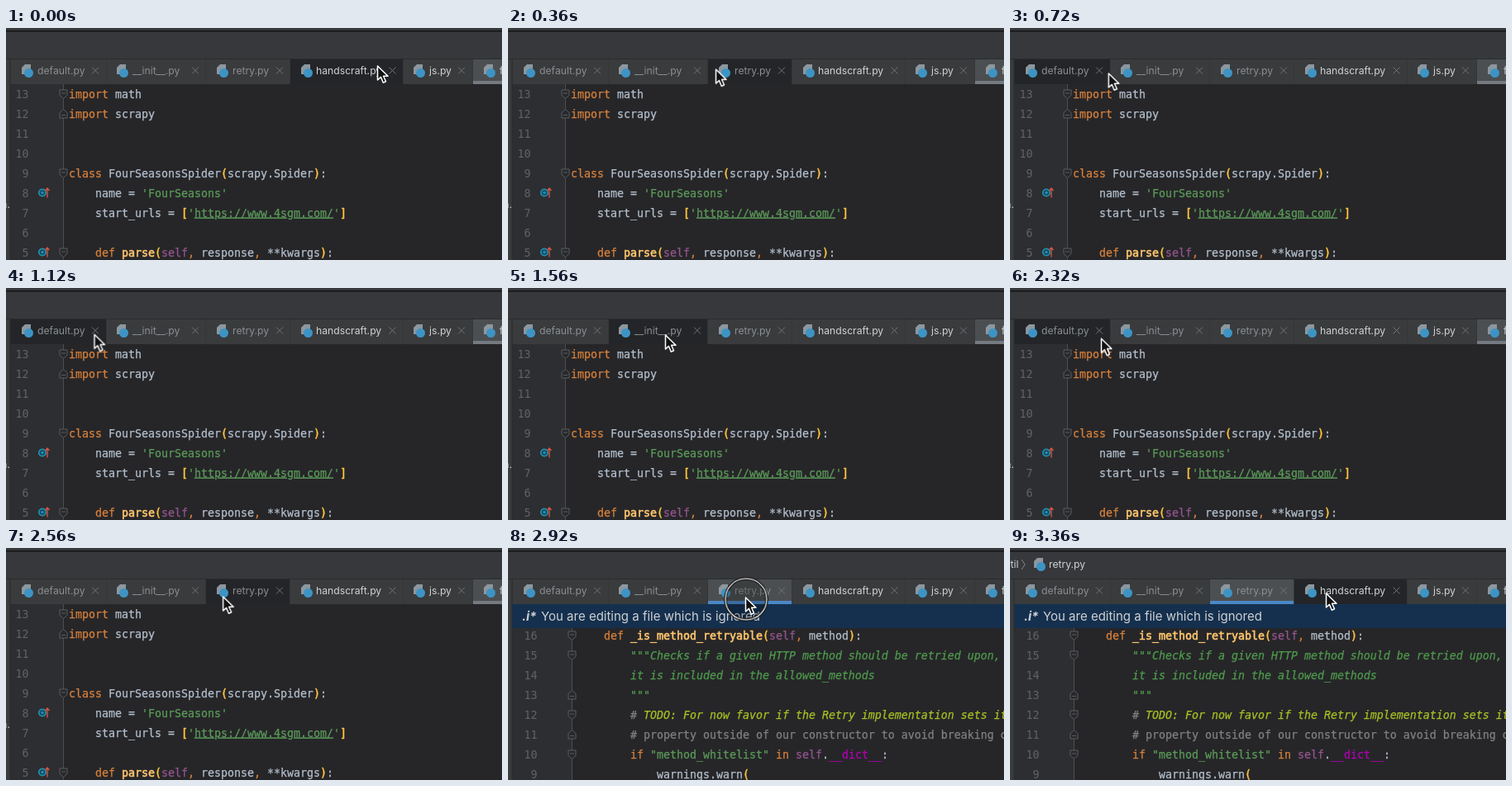
Write an HTML page that moves like this. It is 600x281 px and loops after 3400 ms.

```html
<!DOCTYPE html>
<html lang="en">
<head>
<meta charset="utf-8">
<title>Editor tabs</title>
<style>
html, body { margin: 0; width: 100%; height: 100%; overflow: hidden; background: #262629; }
svg { display: block; width: 600px; height: 281px; }
text { white-space: pre; }
.code { font: 13.29px "DejaVu Sans Mono", "Noto Sans Mono", monospace; color: #b3bfcc; }
.code > text { fill: currentColor; stroke: currentColor; stroke-width: .25px; }
.num { fill: #606366; text-anchor: end; }
.ui { font: 12.2px Inter, "Liberation Sans", sans-serif; fill: #8b8e91; }
.lit { fill: #cfd1d3; }
.banner { font-size: 15px; }
.mark { font-weight: 700; font-style: italic; }
.k { color: #d7803a; }
.s { color: #5b9a58; }
.u { text-decoration: underline #5a8a88; }
.p { color: #94558d; }
.f { color: #ffc66d; stroke-width: .6px; }
.b { color: #ffc53d; stroke-width: .5px; }
.c { color: #808080; }
.d { color: #4f9a4c; font-style: italic; }
.t { color: #a8c023; font-style: italic; }
.m { color: #b200b2; }
.fold { fill: #28292c; stroke: #595c5f; }
.hover { fill: #232528; }

.cursor, .hover, .before, .after, .crumb, .ring { animation: 3.4s infinite step-end; }
.cursor { animation-name: move; animation-timing-function: linear; }
.before { animation-name: before; }
.after { animation-name: after; }
.crumb { animation-name: crumb; }
.ring { animation-name: press; }
.h1 { animation-name: h1; }
.h2 { animation-name: h2; }
.h3 { animation-name: h3; }
.h4 { animation-name: h4; }

@keyframes move {
  0%, 1.18% { transform: translate(449px, 45px); }
  8.5% { transform: translate(298px, 48px); }
  14% { transform: translate(176px, 51px); }
  17.6% { transform: translate(134px, 53px); }
  21.18% { transform: translate(119px, 54px); }
  25% { transform: translate(85px, 56px); }
  29% { transform: translate(80px, 56px); }
  35.3% { transform: translate(122px, 55px); }
  41% { transform: translate(172px, 56px); }
  45.88% { transform: translate(190px, 56px); }
  50% { transform: translate(187px, 57px); }
  58.82% { transform: translate(120px, 61px); }
  62.5% { transform: translate(90px, 62px); }
  66% { transform: translate(88px, 61px); }
  69.4% { transform: translate(121px, 60px); }
  75.29% { transform: translate(262px, 58px); }
  79.5% { transform: translate(284px, 59px); }
  82.3%, 88% { transform: translate(287px, 59px); }
  91% { transform: translate(304px, 58px); }
  98.8%, 100% { transform: translate(382px, 54px); }
}
@keyframes before { 0% { opacity: 1; } 84.7%, 100% { opacity: 0; } }
@keyframes after { 0% { opacity: 0; } 84.7%, 100% { opacity: 1; } }
@keyframes crumb { 0% { opacity: 0; } 88.2%, 100% { opacity: 1; } }
@keyframes press {
  0% { opacity: 0; transform: scale(1.15); }
  82.3% { opacity: 1; transform: scale(1.15); }
  83.5% { opacity: 1; transform: scale(1.07); }
  84.7% { opacity: 1; transform: none; }
  89.4%, 100% { opacity: 0; transform: none; }
}
@keyframes h1 { 0% { opacity: 0; } 20% { opacity: 1; } 35.3% { opacity: 0; } 60% { opacity: 1; } 69.4%, 100% { opacity: 0; } }
@keyframes h2 { 0% { opacity: 0; } 11.7% { opacity: 1; } 20% { opacity: 0; } 35.3% { opacity: 1; } 60% { opacity: 0; } 69.4% { opacity: 1; } 74.1%, 100% { opacity: 0; } }
@keyframes h3 { 0% { opacity: 0; } 6.4% { opacity: 1; } 11.7% { opacity: 0; } 74.1% { opacity: 1; } 84.7%, 100% { opacity: 0; } }
@keyframes h4 { 0% { opacity: 1; } 6.4% { opacity: 0; } 94.1%, 100% { opacity: 1; } }
</style>
</head>
<body>
<svg viewBox="0 0 600 281">
  <defs>
    <g id="file">
      <path d="M5 0h7v12H1V4z" fill="#8c979f"/>
      <circle cx="9.5" cy="10.5" r="5.5" fill="#3d94c4"/>
    </g>
    <path id="close" d="M-4-4l8 8m0-8l-8 8" stroke="#717477" fill="none"/>
    <g id="open" class="fold">
      <path d="M-4.5-5h9v6.5L0 5.5l-4.5-4z"/>
      <path d="M-2.5-1h5"/>
    </g>
    <g id="end" class="fold">
      <path d="M-4.5 5h9v-6.5L0-5.5l-4.5 4z"/>
      <path d="M-2.5 1.5h5"/>
    </g>
    <g id="override">
      <circle r="4.2" fill="#1c4350" stroke="#1f8fb4" stroke-width="1.8"/>
      <circle r="1.8" fill="#1f8fb4"/>
      <path d="M6 6V-5M3.5-2.5L6-5.5l2.5 3" fill="none" stroke="#e0553f" stroke-width="1.3"/>
    </g>
  </defs>

  <rect width="600" height="281" fill="#262629"/>
  <rect width="600" height="38" fill="#37383b"/>
  <rect y="38" width="600" height="30" fill="#393b3d"/>
  <rect y="3" width="600" height="1.5" fill="#141416"/>
  <path d="M0 37.5h600" stroke="#2a2b2d"/>

  <!-- Tab backgrounds -->
  <rect class="hover h1" x="5" y="38" width="116" height="30"/>
  <rect class="hover h2" x="121" y="38" width="120" height="30"/>
  <rect class="hover h3" x="241" y="38" width="102" height="30"/>
  <rect class="hover h4" x="343" y="38" width="137" height="30"/>
  <path d="M121.5 38v30M241.5 38v30M343.5 38v30M480.5 38v30M564.5 38v30" stroke="#343638"/>
  <g class="before">
    <rect x="565" y="38" width="35" height="30" fill="#4c4f51"/>
    <rect x="565" y="64" width="35" height="4" fill="#747a80"/>
  </g>
  <g class="after">
    <rect x="242" y="38" width="101" height="30" fill="#4c4f51"/>
    <rect x="242" y="64" width="101" height="4" fill="#4a88c7"/>
  </g>

  <!-- Tab labels -->
  <g class="ui">
    <use href="#file" x="18" y="44"/><text x="38" y="56">default.py</text><use href="#close" x="108" y="51.5"/>
    <use href="#file" x="133" y="44"/><text x="153" y="56">__init__.py</text><use href="#close" x="229" y="51.5"/>
    <use href="#file" x="254" y="44"/><text x="274" y="56">retry.py</text><use href="#close" x="331" y="51.5"/>
    <use href="#file" x="356" y="44"/><text class="lit" x="375" y="56">handscraft.py</text><use href="#close" x="467.5" y="51.5"/>
    <use href="#file" x="492" y="44"/><text class="lit" x="512" y="56">js.py</text><use href="#close" x="551" y="51.5"/>
    <use href="#file" x="577" y="44"/><text class="lit" x="597" y="56">f</text>
  </g>
  <g class="ui crumb">
    <text class="lit" x="10.5" y="24" text-anchor="end">util</text>
    <path d="M14 14l4 6-4 6" fill="none" stroke="#85888b"/>
    <use href="#file" x="28" y="12"/>
    <text class="lit" x="47" y="24">retry.py</text>
  </g>

  <!-- First file -->
  <g class="code before">
    <rect x="5" y="68" width="65" height="213" fill="#2d2e31"/>
    <path d="M69.5 68v213" stroke="#4c4e51"/>
    <use href="#open" x="69.5" y="80"/>
    <use href="#end" x="69.5" y="104"/>
    <use href="#open" x="69.5" y="176"/>
    <use href="#open" x="69.5" y="272"/>
    <use href="#override" x="44" y="199.5"/>
    <use href="#override" x="44" y="271.5"/>
    <g class="num">
      <text x="27.5" y="84.5">13</text>
      <text x="27.5" y="108.5">12</text>
      <text x="27.5" y="132.5">11</text>
      <text x="27.5" y="156.5">10</text>
      <text x="27.5" y="180.5">9</text>
      <text x="27.5" y="204.5">8</text>
      <text x="27.5" y="228.5">7</text>
      <text x="27.5" y="252.5">6</text>
      <text x="27.5" y="276.5">5</text>
    </g>
    <text x="76" y="84.5"><tspan class="k">import</tspan> math</text>
    <text x="76" y="108.5"><tspan class="k">import</tspan> scrapy</text>
    <text x="76" y="180.5"><tspan class="k">class</tspan> FourSeasonsSpider<tspan class="b">(</tspan>scrapy.Spider<tspan class="b">)</tspan>:</text>
    <text x="108" y="204.5">name = <tspan class="s">'FourSeasons'</tspan></text>
    <text x="108" y="228.5">start_urls = <tspan class="b">[</tspan><tspan class="s">'<tspan class="u">https://www.4sgm.com/</tspan>'</tspan><tspan class="b">]</tspan></text>
    <text x="108" y="276.5"><tspan class="k">def</tspan> <tspan class="f">parse</tspan><tspan class="b">(</tspan><tspan class="p">self</tspan><tspan class="k">,</tspan> response<tspan class="k">,</tspan> **kwargs<tspan class="b">)</tspan>:</text>
  </g>

  <!-- Second file -->
  <g class="code after">
    <rect x="5" y="97" width="73" height="184" fill="#2d2e31"/>
    <path d="M77.5 97v184" stroke="#4c4e51"/>
    <use href="#open" x="77.5" y="106"/>
    <use href="#open" x="77.5" y="130"/>
    <use href="#end" x="77.5" y="178"/>
    <use href="#open" x="77.5" y="202"/>
    <use href="#end" x="77.5" y="226"/>
    <use href="#open" x="77.5" y="250"/>
    <g class="num">
      <text x="35.5" y="111">16</text>
      <text x="35.5" y="135">15</text>
      <text x="35.5" y="159">14</text>
      <text x="35.5" y="183">13</text>
      <text x="35.5" y="207">12</text>
      <text x="35.5" y="231">11</text>
      <text x="35.5" y="255">10</text>
      <text x="35.5" y="279">9</text>
    </g>
    <text x="116" y="111"><tspan class="k">def</tspan> <tspan class="f">_is_method_retryable</tspan><tspan class="b">(</tspan><tspan class="p">self</tspan><tspan class="k">,</tspan> method<tspan class="b">)</tspan>:</text>
    <text class="d" x="148" y="135">"""Checks if a given HTTP method should be retried upon,</text>
    <text class="d" x="148" y="159">it is included in the allowed_methods</text>
    <text class="d" x="148" y="183">"""</text>
    <text x="148" y="207"><tspan class="c"># </tspan><tspan class="t">TODO: For now favor if the Retry implementation sets its</tspan></text>
    <text class="c" x="148" y="231"># property outside of our constructor to avoid breaking our</text>
    <text x="148" y="255"><tspan class="k">if</tspan> <tspan class="s">"method_whitelist"</tspan> <tspan class="k">in</tspan> <tspan class="p">self</tspan>.<tspan class="m">__dict__</tspan>:</text>
    <text x="180" y="279">warnings.warn<tspan class="b">(</tspan></text>
    <rect x="5" y="68" width="595" height="29" fill="#15304e"/>
    <g class="ui banner">
      <text class="lit mark" x="17" y="88">.i*</text>
      <text class="lit" x="40" y="88">You are editing a file which is ignored</text>
    </g>
  </g>

  <!-- Side panel -->
  <rect y="68" width="5" height="213" fill="#393b3d"/>
  <path d="M5 38v243" stroke="#2a2b2d"/>
  <text class="ui lit before" x="5" y="217.5" text-anchor="end">n.</text>

  <g class="cursor">
    <g transform="translate(1 3)">
      <g class="ring">
        <circle r="25" fill="#000" fill-opacity=".2" stroke="#111" stroke-width="3.6"/>
        <circle r="25" fill="none" stroke="#e4e4e4" stroke-width="1.4"/>
      </g>
    </g>
    <path d="M.5 1v17l3.9-3.6 2.9 6.8 3.2-1.4-2.9-6.6h5.4z" fill="#111" stroke="#fff" stroke-width="1.5" stroke-linejoin="round"/>
  </g>
</svg>
</body>
</html>
```
